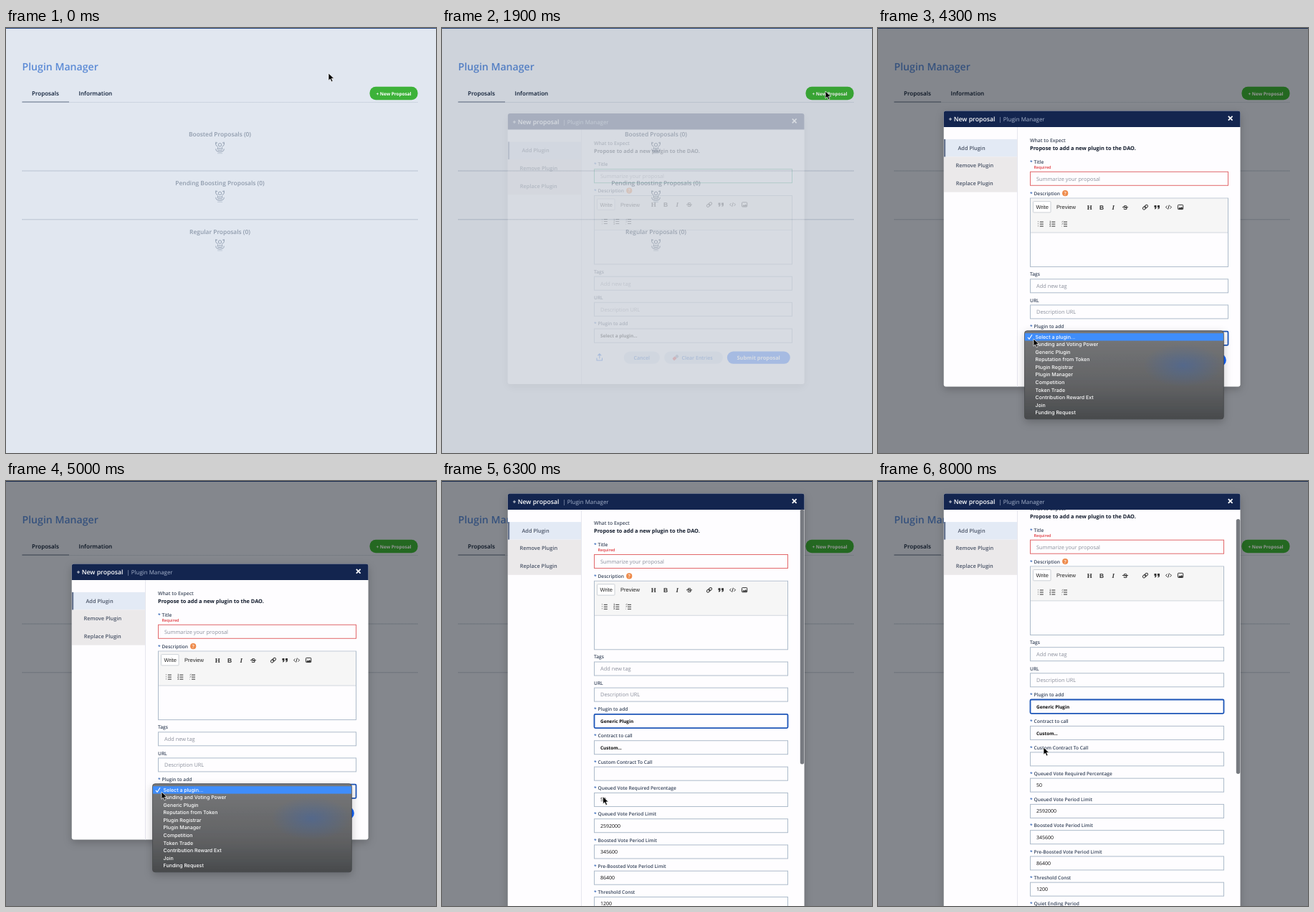
An HTML page for the animation above (8100 ms loop, 600 px wide and 592 px high).

```html
<!DOCTYPE html>
<html lang="en">
<head>
<meta charset="utf-8">
<title>Plugin Manager</title>
<style>
  html, body { margin: 0; width: 100%; height: 100%; overflow: hidden; background: #e1e7f0; }
  svg { display: block; width: 100%; height: 100%; }
  text { font-family: "Open Sans", "Noto Sans", sans-serif; font-weight: 600; text-rendering: geometricPrecision; white-space: pre; }
  .mid { text-anchor: middle; }
  .title { font-size: 14.1px; fill: #5b8ad5; }
  .tab { font-size: 8.05px; fill: #0b1c36; }
  .section { font-size: 8.4px; fill: #8f9bac; }
  .new { font-size: 6.4px; font-weight: 700; fill: #fff; }
  .tip { font-size: 5.93px; font-weight: 700; fill: #fff; }
  .head { font-size: 8.7px; fill: #fff; }
  .sub { font-size: 7.95px; font-weight: 400; fill: #a9b5cd; }
  .nav { font-size: 7.4px; fill: #4b5568; }
  .intro { font-size: 6.85px; fill: #3f4a5c; }
  .lead { font-size: 7.4px; font-weight: 700; fill: #111a2b; }
  .label { font-size: 6.6px; fill: #36445a; }
  .star { fill: #2f62b4; }
  .error { font-size: 5.5px; fill: #e0383e; }
  .hint { font-size: 7.4px; font-weight: 400; fill: #8b909c; }
  .choice { font-size: 6.4px; font-weight: 700; fill: #0a0a0a; }
  .value { font-size: 7px; font-weight: 400; fill: #111; }
  .pill { font-size: 7.05px; fill: #2361c4; }
  .submit { font-size: 7.4px; font-weight: 700; fill: #fff; }
  .editor { font: 400 7.55px "Liberation Sans", Arial, sans-serif; fill: #222; }
  .glyph { font: 700 9px "Liberation Sans", Arial, sans-serif; fill: #333; }
  .item { font: 500 7px Inter, sans-serif; fill: #fff; }
  .field { fill: #fefdff; stroke: #adbbca; stroke-width: 1; }
  .line { fill: none; stroke: #333; stroke-width: 1; }
</style>
</head>
<body>
<svg id="stage" viewBox="0 0 600 592" preserveAspectRatio="none"></svg>
<script>
const LOOP = 8100;
const ROW = 10.57;

const text = (x, y, cls, str) => `<text x="${x}" y="${y}" class="${cls}">${str}</text>`;
const rect = (x, y, w, h, attrs = '') => `<rect x="${x}" y="${y}" width="${w}" height="${h}" ${attrs}/>`;
const path = (d, attrs = 'class="line"') => `<path d="${d}" ${attrs}/>`;
const label = (y, str) => text(212, y, 'label star', '*') + text(217.5, y, 'label', str);
const field = (y, h = 19, attrs = '') => rect(212.5, y, 276, h, `class="field" ${attrs}`);

const spirit = y => `<g transform="translate(298.5 ${y})" fill="none" stroke="#96a3b5" stroke-width="1">
  <circle cy="-3.5" r="2.2"/>
  <path d="M-5.5-7.5q-1.5 5 2.5 6.5M5.5-7.5q1.5 5-2.5 6.5M-6.5-5.5l3-1M6.5-5.5l-3-1M-3 0v3M3 0v3M-2 1.5h4M-5.5 2q-1 4 5.5 4.5q6.500-.5 5.500-4.5M-3 4h6"/>
  <path d="M-3.5 8.500h7" stroke="#bec8d6"/></g>`;

const section = (y, name) => text(298.5, y, 'section mid', `${name} (0)`) + spirit(y + 14.8);
const divider = (y, color) => path(`M22.500 ${y}H575`, `stroke="${color}" stroke-width="1" stroke-dasharray="1.500 .5"`);

const page = `
  ${rect(0, 0, 600, 592, 'fill="#e1e7f0"')}
  ${rect(0, 0, 600, 1, 'fill="#2a4a85"')}
  ${text(22.5, 59.3, 'title', 'Plugin Manager')}
  ${text(36, 93.7, 'tab', 'Proposals')}${text(101.5, 93.7, 'tab', 'Information')}
  ${divider(103.5, '#c5cedb')}
  ${rect(22.5, 102.5, 65.5, 1, 'fill="#66758a"')}
  ${rect(507.5, 81.7, 67, 18.5, 'id="newButton" rx="8.500"')}
  ${text(541, 93.6, 'new mid', '+ New Proposal')}
  ${section(151.4, 'Boosted Proposals')}
  ${divider(199, '#aab6c7')}
  ${section(219, 'Pending Boosting Proposals')}
  ${divider(266.8, '#aab6c7')}
  ${section(286.7, 'Regular Proposals')}
  <g id="tooltip">
    ${rect(332.5, 50.3, 242.2, 29, 'rx="6.500" fill="#03152e" filter="url(#soft)"')}
    ${path('M531 79h8l-4 4z', 'fill="#03152e"')}
    ${text(340.5, 62, 'tip', 'A small amount of ETH is necessary to submit a proposal in order to pay gas')}
    ${text(340.5, 71.8, 'tip', 'costs')}
  </g>`;

const list = (x, marks) => [266.5, 269.5, 272.5].map((y, i) =>
  path(`M${x - 1} ${y}h5`) + text(x - 4, y + 1.2, 'glyph" style="font-size:3.500px', marks[i])).join('');

const editor = `
  ${label(229, 'Description')}
  <circle cx="261.2" cy="226.600" r="4.100" fill="#ee8a4a"/>
  ${text(261.2, 229.2, 'mid" style="font-size:7px;font-weight:700;fill:#fbe6d6', '?')}
  ${field(233.5, 95.5)}
  <rect x="213" y="234" width="275" height="47" fill="#f6f6f6" class="wide" data-gap="1"/>
  <rect x="213" y="281" width="275" height=".8" fill="#c5ccd4" class="wide" data-gap="1"/>
  ${rect(216.5, 238, 24.5, 15.3, 'rx="1" fill="#fff" stroke="#c3c8cf" stroke-width=".8"')}
  ${text(220.4, 248.5, 'editor', 'Write')}${text(249, 248.5, 'editor', 'Preview')}
  ${text(295.3, 249, 'glyph mid" style="font-family:Liberation Serif,serif', 'H')}
  ${text(312, 249, 'glyph mid" style="font-size:8.500px', 'B')}
  ${text(328.2, 249, 'glyph mid" style="font-style:italic;font-family:Liberation Serif,serif', 'I')}
  ${text(345, 249, 'glyph mid" style="font-size:8.500px', 'S')}${path('M341 246h8')}
  <g transform="rotate(-40 373 246)" class="line"><rect x="368.800" y="244.300" width="4.800" height="3.400" rx="1.700"/><rect x="372.300" y="244.300" width="4.800" height="3.400" rx="1.700"/></g>
  ${path('M385.500 243.500h3v3q0 2-2.500 2.500v-1.500q1 0 1-1h-1.500zM390 243.500h3v3q0 2-2.500 2.500v-1.500q1 0 1-1h-1.500z', 'fill="#333"')}
  ${path('M403.500 244l-2 2l2 2M407.500 244l2 2l-2 2M406.300 243l-1.600 6')}
  ${rect(418.5, 242.8, 7.2, 6.2, 'rx=".8" class="line"')}
  ${path('M419 248.500l2-2.500l1.300 1.200l1.500-2l1.800 3.300z', 'fill="#333"')}
  ${list(226.8, ['•', '•', '•'])}${list(243.3, ['1', '2', '3'])}${list(260, ['✓', '✓', '-'])}`;

const buttons = `
  <g id="buttons">
    ${path('M216 459.500v3.500h7.500v-3.500M219.800 460.500v-6.500M217.300 456.300l2.500-2.500l2.500 2.500', 'fill="none" stroke="#1f66e0" stroke-width="1.100"')}
    ${rect(253.7, 450.5, 50.3, 17.2, 'rx="8.600" fill="#dce6f3"')}${text(278.8, 461.6, 'pill mid', 'Cancel')}
    ${rect(310, 450.5, 82, 17.2, 'rx="8.600" fill="#dce6f3"')}${text(334.5, 461.6, 'pill', 'Clear Entries')}
    <g transform="rotate(-42 326 459)">${rect(321.5, 457, 5, 4, 'rx="1" fill="#d9423f"')}${rect(326.5, 457, 4, 4, 'rx="1" fill="#7d8da8"')}</g>
    ${rect(397.8, 450.5, 88, 17.2, 'rx="8.600" fill="#0f62fe"')}${text(441.7, 461.8, 'submit mid', 'Submit proposal')}
  </g>`;

const settings = [
  ['Custom Contract To Call', ''],
  ['Queued Vote Required Percentage', '50'],
  ['Queued Vote Period Limit', '2592000'],
  ['Boosted Vote Period Limit', '345600'],
  ['Pre-Boosted Vote Period Limit', '86400'],
  ['Threshold Const', '1200'],
  ['Quiet Ending Period', '172800'],
].map(([name, value], i) => {
  const y = 488.2 + i * 36.25;
  return label(y, name) + field(y + 4.2) + text(221, y + 16.2, 'value', value);
}).join('');

const modal = `
  <g id="modal">
    <rect id="panel" x="91.800" width="413.700" rx="3" fill="#fefdff" filter="url(#shadow)"/>
    <g id="content">
      ${text(212, 162.6, 'intro', 'What to Expect')}
      ${text(212, 173.8, 'lead', 'Propose to add a new plugin to the DAO.')}
      ${label(192.3, 'Title')}
      ${text(217.5, 199.8, 'error" id="required', 'Required')}
      <g id="titleField">${field(196.7, 19, 'id="titleBox"')}${text(221, 209, 'hint', 'Summarize your proposal')}</g>
      <g id="lower">
        ${editor}
        ${text(212, 341.7, 'label', 'Tags')}${field(346.2)}${text(221, 358.5, 'hint', 'Add new tag')}
        ${text(212, 378.2, 'label', 'URL')}${field(382.3)}${text(221, 394.6, 'hint', 'Description URL')}
        ${label(414, 'Plugin to add')}${field(419, 19.3, 'id="selectBox"')}
        ${text(221, 431, 'choice" id="choice', '')}
        ${buttons}
        <g id="settings">${label(451.1, 'Contract to call')}${field(455.9)}${text(221, 468, 'choice', 'Custom...')}${settings}</g>
      </g>
    </g>
    <g id="frame">
      ${rect(194, 141, 1, 355, 'id="sideLine" fill="#e6e6ee"')}
      ${rect(92, 158.5, 102, 24.5, 'fill="#e3eaf5"')}
      ${rect(92, 183, 102, 49.2, 'fill="#ebe9ea"')}
      ${rect(92, 158.5, 2.2, 24.5, 'fill="#66748f"')}
      ${text(130.5, 173.2, 'nav mid', 'Add Plugin')}
      ${text(134.8, 197.9, 'nav mid', 'Remove Plugin')}
      ${text(134.8, 222.5, 'nav mid', 'Replace Plugin')}
      ${path('M91.800 141.500v-19.500q0-3 3-3h407.700q3 0 3 3v19.500z', 'fill="#13254f"')}
      ${text(98.5, 133.8, 'head', '+ New proposal')}
      ${text(168.3, 133.6, 'sub', '| Plugin Manager')}
      ${path('M488.800 126.500l5.800 5.800m0-5.800l-5.800 5.800', 'stroke="#fff" stroke-width="1.700"')}
    </g>
    ${rect(499.8, 39.5, 5.4, 355, 'id="thumb" rx="2.700" fill="#777a80"')}
  </g>`;

const plugins = ['Select a plugin...', 'Funding and Voting Power', 'Generic Plugin', 'Reputation from Token',
  'Plugin Registrar', 'Plugin Manager', 'Competition', 'Token Trade', 'Contribution Reward Ext', 'Join', 'Funding Request'];

const dropdown = `
  <g id="dropdown">
    ${rect(204.5, 421.8, 277.8, 123, 'rx="3.500" fill="url(#menu)" stroke="#454749" stroke-width=".8" filter="url(#shadow)"')}
    ${rect(370, 440, 112, 60, 'fill="url(#glow)"')}
    ${rect(204.9, 425.2, 277, 10.4, 'id="highlight" fill="#3f8dfb"')}
    ${path('M209 430.800l2 2.500l4-6', 'fill="none" stroke="#fff" stroke-width="1.100"')}
    ${plugins.map((name, i) => text(219.6, 432.6 + i * ROW, 'item', name)).join('')}
  </g>`;

const $ = id => document.getElementById(id);
$('stage').innerHTML = `
  <defs>
    <filter id="soft" x="-10%" y="-30%" width="120%" height="170%"><feDropShadow dx="0" dy="2" stdDeviation="2" flood-color="#456" flood-opacity=".35"/></filter>
    <filter id="shadow" x="-10%" y="-10%" width="120%" height="125%"><feDropShadow dx="0" dy="4" stdDeviation="6" flood-opacity=".22"/></filter>
    <linearGradient id="menu" x2="0" y2="1"><stop stop-color="#77787a"/><stop offset=".6" stop-color="#626365"/><stop offset="1" stop-color="#484a4c"/></linearGradient>
    <radialGradient id="glow"><stop stop-color="#3f66a8" stop-opacity=".5"/><stop offset="1" stop-color="#3f66a8" stop-opacity="0"/></radialGradient>
  </defs>
  ${page}
  ${rect(0, 0, 600, 592, 'id="dim" fill="#000"')}
  ${modal}${dropdown}
  ${path('M0 0v10.200l2.400-2.200l1.700 3.900l1.900-.8l-1.700-3.800h3.400z', 'id="cursor" fill="#000" stroke="#fff" stroke-width=".7" stroke-linejoin="round"')}`;

const cursorTrack = [
  [0, 450, 63], [200, 450, 63], [800, 535, 88], [2200, 535, 88], [3000, 261, 340], [3600, 261, 340],
  [4200, 217, 433], [5000, 217, 433], [5700, 221, 455], [6100, 221, 455], [6800, 239, 378],
  [6900, 239, 378], [8000, 231, 371], [LOOP, 231, 371],
];
const scrollTrack = [[0, 0], [6500, 0], [6900, 9.6], [8000, 20.3], [LOOP, 20.3]];

const progress = (t, from, to) => Math.min(1, Math.max(0, (t - from) / (to - from)));
const smooth = k => k * k * (3 - 2 * k);

function sample(track, t) {
  const i = track.findIndex(key => key[0] > t);
  const [a, b] = [track[i - 1], track[i]];
  const k = smooth(progress(t, a[0], b[0]));
  return a.slice(1).map((v, j) => v + (b[j + 1] - v) * k);
}

const set = (id, attrs) => { for (const name in attrs) $(id).setAttribute(name, attrs[name]); };
const move = (id, x, y) => set(id, { transform: `translate(${x} ${y})` });
const show = (id, on) => { $(id).style.display = on ? '' : 'none'; };

function render(t) {
  const [x, y] = sample(cursorTrack, t);
  const [scroll] = sample(scrollTrack, t);
  const required = t >= 4300;
  const expanded = t >= 6020;
  const opened = progress(t, 1850, 2100);
  const shift = expanded ? -101.4 : required ? -3.6 : 0;
  const extra = required ? 7.2 : 0;
  const fieldWidth = expanded ? 270 : 276;

  move('cursor', x, y);
  $('newButton').style.fill = t > 780 && t < 1850 ? '#59bf58' : '#3db239';
  set('tooltip', { opacity: progress(t, 780, 1000) * (1 - progress(t, 1750, 1850)) });
  set('dim', { opacity: 0.415 * opened });
  set('modal', { opacity: opened });

  set('panel', { y: 119 + shift, height: expanded ? 700 : 377 + extra });
  set('sideLine', { height: expanded ? 600 : 355 + extra });
  move('frame', 0, shift);
  move('content', 0, shift - scroll);
  move('titleField', 0, extra);
  move('lower', 0, extra);
  show('required', required);
  show('buttons', !expanded);
  show('settings', expanded);
  show('thumb', expanded);
  set('thumb', { y: 39.5 + scroll * 0.66 });

  document.querySelectorAll('.field').forEach(el => el.setAttribute('width', fieldWidth));
  document.querySelectorAll('.wide').forEach(el => el.setAttribute('width', fieldWidth - 1));
  $('titleBox').style.stroke = required ? '#e2686b' : '#45ad8b';
  $('selectBox').style.stroke = required ? '#1d55b8' : '';
  $('selectBox').style.strokeWidth = required ? 1.8 : '';
  $('selectBox').setAttribute('rx', required ? 1.5 : 0);
  $('choice').textContent = expanded ? 'Generic Plugin' : 'Select a plugin...';

  show('dropdown', required && !expanded);
  set('dropdown', { opacity: 1 - progress(t, 5810, 6020) });
  const row = Math.min(plugins.length - 1, Math.max(0, Math.floor((y - 425) / ROW)));
  set('highlight', { y: 425.2 + row * ROW });
}

function tick(now) {
  render(now % LOOP);
  requestAnimationFrame(tick);
}
render(0);
requestAnimationFrame(tick);
</script>
</body>
</html>
```
